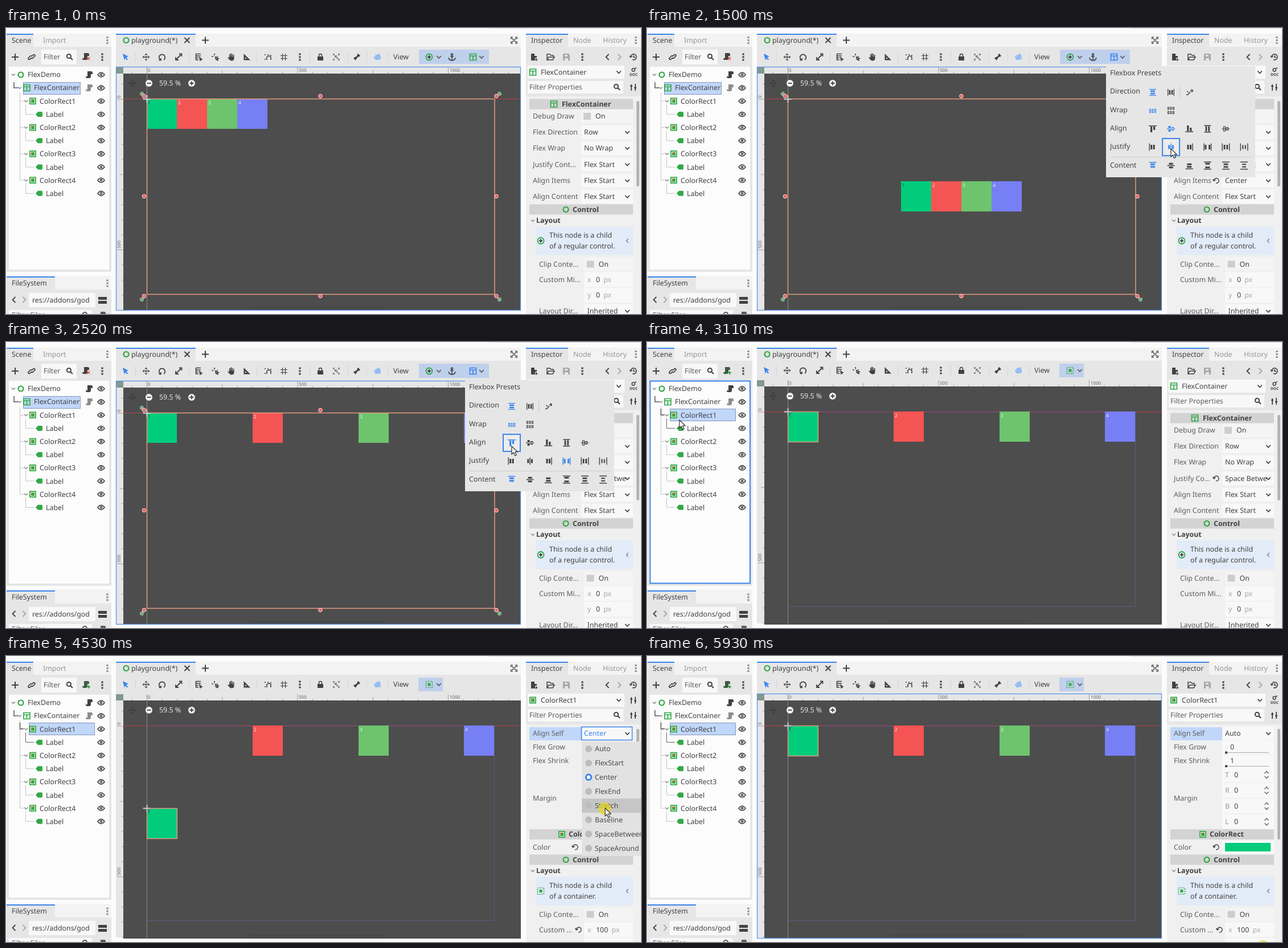
These frames come from a looping animation (1115x502 px, 6.05 s). An HTML page:

```html
<!DOCTYPE html>
<html lang="en">
<head>
<meta charset="utf-8">
<title>Flex container editor</title>
<style>
html, body { margin: 0; width: 100%; height: 100%; overflow: hidden; background: #fcfcfc }
svg { display: block; width: 100%; height: 100% }
text { font-family: "Noto Sans", "Open Sans", sans-serif; text-rendering: geometricPrecision; white-space: pre }
</style>
</head>
<body>
<svg id="stage" viewBox="0 0 1115 502"></svg>
<script>
const LOOP = 6050;
const BLUE = '#3a85ee', GREEN = '#32a847', INK = '#414141', SOFT = '#5c5c5c', PALE = '#a8a8a8';
const BASE = '#e6e6e6', FIELD = '#f8f8f8', WHITE = '#fcfcfc', ORANGE = '#e8997d';
const FILLS = ['#00cc7c', '#f55454', '#6dc46d', '#777ff5'];

// Icon paths around 0,0: [path, stroke width or 0 for a filled shape]
const ICONS = {
  plus: ['M-6 0H6M0-6V6', 2],
  close: ['M-4.5-4.5L4.5 4.5M4.5-4.5L-4.5 4.5', 2],
  down: ['M-3.8-2L0 2L3.8-2', 1.8],
  fold: ['M-3-1.5L0 1.5L3-1.5', 1.4],
  left: ['M2.5-5L-2.5 0L2.5 5', 1.8],
  right: ['M-2.5-5L2.5 0L-2.5 5', 1.8],
  less: ['M1.5-3.5L-1.5 0L1.5 3.5', 1.2],
  dots: ['M-1.6-6.6h3.2v3.2h-3.2zM-1.6-1.6h3.2v3.2h-3.2zM-1.6 3.4h3.2v3.2h-3.2z', 0],
  search: ['M2-1.5A3.6 3.6 0 1 1-5.2-1.5A3.6 3.6 0 1 1 2-1.5M1 1L5 5', 2],
  ring: ['M4.5 0A4.5 4.5 0 1 1-4.5 0A4.5 4.5 0 1 1 4.5 0', 2.2],
  eye: ['M-6 0Q0-8 6 0Q0 8-6 0zM-1.6 0a1.6 1.6 0 1 0 3.2 0a1.6 1.6 0 1 0-3.2 0', 1.6],
  script: ['M-3-6H4Q6-6 6-3V-1H3V3Q3 6 0 6H-4Q-6 6-6 3H-3z', 0],
  link: ['M-1 2L-3 4Q-5 5-6 3Q-6 1-4 0L-2-2Q0-3 1-1M1-2L3-4Q5-5 6-3Q6-1 4 0L2 2Q0 3-1 1', 1.7],
  flex: ['M-5.5-5.5H5.5V5.5H-5.5zM-5.5-2H5.5M0-2V5.5', 1.7],
  tag: ['M-6 0L-2-4.5H4.5Q6-4.5 6-3V3Q6 4.5 4.5 4.5H-2z', 0],
  arrow: ['M-5-6L5-1L1 0.5L4 4L2.5 5.5L-0.7 2L-2 6z', 0],
  move: ['M0-6.5L2.6-3.5H-2.6zM0 6.5L2.6 3.5H-2.6zM-6.5 0L-3.5-2.6V2.6zM6.5 0L3.5-2.6V2.6zM-3-.7H-1V.7H-3zM1-.7H3V.7H1zM-1.5-1.5h3v3h-3z', 0],
  turn: ['M-3 5A5.3 5.3 0 1 1 3 5M-5.5 5.5H-2V2', 1.7],
  scale: ['M-5 0V5H0M-4 4L4-4M1-5.5H5.5V-1', 1.8],
  list: ['M-5-5.5H4M-5-2H4M-5 1.5H0M-5 5H0M-4.5-5.5V5M2 1L6 4L3 6z', 1.6],
  pivot: ['M-6-1H-3M-1-6V-3M-1-1H-.5M3-1H5M1 0L6 2.5L3.5 3.5L5.5 6L1.5 4z', 1.7],
  hand: ['M-6 0L-3 1V-5H-1.4V-1H-.7V-6.5H1V-1H1.7V-5.5H3.2V-.5H4V-4H5.5V3Q5 6.5 1 6.5Q-3 6-6 0z', 0],
  ruler: ['M-5.5-6V5.5H6zM-3 0V3H0z', 0],
  snap: ['M-5-5v2M-5 3v2M0-5v2M5-4v2M-2 5V0Q2-4 5 0V5', 1.6],
  grid: ['M-6-2.5H6M-6 2.5H6M-2.5-6V6M2.5-6V6', 1.2],
  lock: ['M-5-1H5V6H-5zM-3.3-1V-3A3.3 3.3 0 0 1 3.3-3V-1H1.8V-3A1.8 1.8 0 0 0-1.8-3V-1z', 0],
  group: ['M-6-6h3v3h-3zM3-6h3v3h-3zM-6 3h3v3h-3zM3 3h3v3h-3zM-3-3h4v4h-4zM0 0h3v3H0z', 0],
  bone: ['M-5 1L0-1.5L1-5Q4-7 4-3.5Q7-4 5-1L1.5 0L-1 4Q-3 7-3.7 3.5Q-7 3-5 1z', 0],
  camera: ['M-6-1H-3Q-5-5 0-4Q2-8 5-4Q6-1 4 0L6-1V5L3 3V5H-4V2H-6z', 0],
  anchor: ['M0-3V6M-6 1Q-5 6 0 6Q5 6 6 1M-3-1H3M-1.5-4.5a1.5 1.5 0 1 1 3 0a1.5 1.5 0 1 1-3 0', 1.6],
  expand: ['M-6-6H-1.5L-6-1.5zM6-6H1.5L6-1.5zM-6 6H-1.5L-6 1.5zM6 6H1.5L6 1.5zM-5-4L-4-5L5 4L4 5zM5-4L4-5L-5 4L-4 5z', 0],
  page: ['M-5-6H1V-2H5V1H2V6H-5zM3 2h1.5v1.7H6.5v1.5H4.5V7H3z', 0],
  folder: ['M-6 5V-5H-1L1-3H5V-1M-6 5L-3 0H7L4 5z', 1.5],
  save: ['M-6-6H4L6-4V6H-6zM-3-4V-1H2V-4zM-3 2V6H3V2z', 0],
  clock: ['M-5-1A5 5 0 1 1-2 4.5M0-3V0.5H3M-7-2L-5 0.5L-2.5-1.5', 1.6],
  help: ['M-3-2.5a2.6 2.6 0 1 0 5.2 0a2.6 2.6 0 1 0-5.2 0M2-5L5-6', 1.5],
  tools: ['M-4-5V-1M-4-1V6M3-6V0M3 0V6M-6-2H-2M1 1H5', 1.8],
  reset: ['M-4.5-1A4.3 4.3 0 1 1-1 4.3M-6.5-2.5L-4.5.5L-1.5-1.5', 1.5],
  spin: ['M-3.5-2.5L0-6L3.5-2.5M-3.5 2.5L0 6L3.5 2.5', 1.3],
  row: ['M-6-6h12v1.3h-12zM-4-3.4h8v2.6h-8zM-4 .8h8v2.6h-8zM-6 4.7h12v1.3h-12z', 0],
  swap: ['M-6 4h3l4-5M1-3H5M3-5.5L5.5-3L3-.5M-2 0L-5-2', 1.4],
  nowrap: ['M-5.5-2.5h2v6h-2zM-1-2.5h2v6h-2zM3.5-2.5h2v6h-2z', 1.1],
  wrap: ['M-5.5-6h2v4h-2zM-1-6h2v4h-2zM3.5-6h2v4h-2zM-5.5 1.5h2v4h-2zM-1 1.5h2v4h-2zM3.5 1.5h2v4h-2z', 1.1],
  top: ['M-7-6h14v1.4h-14zM-4-4h3.2v10h-3.2zM1-4h3.2v6h-3.2z', 0],
  mid: ['M-7-.8h14v1.5h-14zM-4.5-5h4v10h-4zM1-3h4v6h-4z', 0],
  fill: ['M-6-6.5h12v1.4h-12zM-6 5.1h12v1.4h-12zM-3.8-4.5h2.8v9h-2.8zM1-4.5h2.8v9h-2.8z', 0],
  line: ['M-7 0H7M-4-4h3v8h-3zM1-2.5h3v5h-3z', 1.2],
  start: ['M-6.5-6.5h1.4v13h-1.4zM-3.8-4h3v8h-3zM.7-4h3v8h-3z', 0],
  centre: ['M-.7-6.5h1.4v13h-1.4zM-4.8-3.5h3v7h-3zM1.8-3.5h3v7h-3z', 0],
  between: ['M-7-6.5h1.4v13h-1.4zM5.6-6.5H7v13H5.6zM-4.8-4h3v8h-3zM1.8-4h3v8h-3z', 0],
  around: ['M-7-6.5h1.4v13h-1.4zM5.6-6.5H7v13H5.6zM-3.8-4h2.8v8h-2.8zM1-4h2.8v8H1z', 0],
  evenly: ['M-7-6.5h1.4v13h-1.4zM5.6-6.5H7v13H5.6zM-3.2-3.5h2v7h-2zM1.2-3.5h2v7h-2z', 0]
};

const rect = (x, y, w, h, fill, more = '') => `<rect x="${x}" y="${y}" width="${w}" height="${h}" fill="${fill}" ${more}/>`;
const frame = (x, y, w, h, color, sw = 1, fill = 'none') => rect(x, y, w, h, fill, `stroke="${color}" stroke-width="${sw}"`);
const disc = (x, y, r, fill, more = '') => `<circle cx="${x}" cy="${y}" r="${r}" fill="${fill}" ${more}/>`;
const path = (d, color, sw = 1) => `<path d="${d}" fill="none" stroke="${color}" stroke-width="${sw}"/>`;
const text = (x, y, s, fill = INK, size = 12.4, more = '') =>
  `<text x="${x}" y="${y + size * .36}" fill="${fill}" font-size="${size}" ${more}>${s}</text>`;
const bold = (x, y, s, size = 12.4) => text(x, y, s, INK, size, 'font-weight="600"');
const icon = (name, x, y, color = INK, turn = '') => {
  const [d, sw] = ICONS[name];
  const ink = sw ? `fill="none" stroke="${color}" stroke-width="${sw}"` : `fill="${color}" fill-rule="evenodd"`;
  return `<path transform="translate(${x} ${y}) ${turn}" d="${d}" ${ink}/>`;
};
const icons = (y, list) => list.map(([n, x, c]) => icon(n, x, y, c)).join('');
const swatchIcon = (x, y) => frame(x - 5, y - 5, 10, 10, GREEN, 1.8, '#eefaee') +
  rect(x - 3, y - 3, 6, 6, GREEN) + rect(x - 3, y - 3, 3, 3, '#c9703f');
const plusDisc = (x, y, r, fill, ink) => disc(x, y, r, fill) + path(`M${x - 3.5} ${y}h7M${x} ${y - 3.5}v7`, ink, 1.8);
const plusRing = (x, y) => disc(x, y, 5.5, 'none', `stroke="${GREEN}" stroke-width="1.8"`) + path(`M${x - 3} ${y}h6M${x} ${y - 3}v6`, INK, 2);
const childIcon = (x, y) => rect(x - 5.5, y - 5.5, 11, 11, 'none', `stroke="${GREEN}" stroke-width="1.7" stroke-dasharray="2 2"`) +
  rect(x - 2.5, y - 2.5, 5, 5, GREEN);
const tab = (x, w, y, s) => rect(x, y, w, 23, BASE) + rect(x, y, w, 2, BLUE) + text(x + 9, y + 11.5, s);

function shell() {
  return rect(0, 0, 1115, 502, WHITE) + rect(848, 0, 267, 1, '#ddd') +
    rect(1, 10, 184, 23, '#f3f3f3') + rect(1, 33, 184, 395, BASE) + tab(1, 47, 10, 'Scene') +
    text(65, 21.5, 'Import', '#969696') + icon('dots', 178, 21.5, '#8c8c8c') +
    icons(51, [['plus', 16], ['link', 45]]) + rect(62, 38, 62, 26, FIELD) + text(66, 51, 'Filter', SOFT) + icons(51, [['search', 112], ['dots', 169]]) +
    rect(1, 435, 184, 25, '#f3f3f3') + rect(1, 459, 184, 43, BASE) + tab(1, 85, 436, 'FileSystem') + icon('dots', 178, 448, '#8c8c8c') +
    icon('left', 14, 477) + icon('right', 32, 477, PALE) + rect(40, 465, 117, 25, FIELD) + text(46, 477.5, 'res://addons/god') +
    rect(162, 472, 15, 5, INK) + rect(162, 479, 15, 5, INK) + rect(5, 495, 146, 7, FIELD) +
    text(10, 504, 'Filter Files', SOFT) + icon('search', 140, 504, SOFT) + icon('script', 169, 504, SOFT) +
    rect(193, 10, 711, 23, '#f3f3f3') + rect(193, 10, 140, 23, BASE) + rect(193, 10, 140, 2, BLUE) + icon('ring', 211, 21.5, GREEN) +
    text(220, 21.5, 'playground(*)') + icon('close', 318, 21.5) + icon('plus', 350, 21.5) + icon('expand', 892, 21.5) +
    rect(913, 10, 202, 23, '#f3f3f3') + rect(913, 33, 202, 469, BASE) + rect(913, 120, 202, 382, '#f0f0f0') + tab(913, 74, 10, 'Inspector') +
    text(996, 21.5, 'Node', '#969696') + text(1048, 21.5, 'History', '#969696') + icon('dots', 1106, 21.5, '#8c8c8c') +
    icons(51, [['page', 927], ['folder', 956], ['save', 984, PALE], ['dots', 1012], ['left', 1056], ['right', 1077, PALE], ['clock', 1102]]);
}

function tree(s) {
  const y = i => 82 + i * 23.15;
  let o = rect(5, 68, 176, 356, WHITE);
  if (s.treeFocus) o += frame(5.5, 68.5, 175.5, 355, BLUE, 2);
  o += s.child ? frame(40.5, 117.5, 115, 21, '#8498bb', 1, '#c1d7fa') : frame(30.5, 95.5, 100, 21, '#8498bb', 1, '#c1d7fa');
  o += path('M14 95V105H21', '#555', 1.5) + path('M24.5 113V267' + [2, 4, 6, 8].map(i => `M24.5 ${y(i)}H31`).join(''), '#c4c4c4');
  if (s.child) o += path('M24.5 117V128H31', '#555', 1.5);
  o += icon('fold', 13, 82, '#888') + icon('ring', 26, 82, GREEN) + text(38, 82, 'FlexDemo') + icon('script', 146, 82);
  o += icon('fold', 24, 105, '#888') + icon('flex', 36.5, 105, GREEN) + text(49, 105, 'FlexContainer') + icon('script', 146, 105, '#8d8d8d');
  for (let n = 1; n < 5; n++) {
    const a = y(n * 2), b = y(n * 2 + 1);
    o += icon('fold', 35, a, '#888') + swatchIcon(47, a) + text(59, a, 'ColorRect' + n) +
      path(`M34.5 ${a + 6}V${b}H49`, s.child && n < 2 ? '#666' : '#c4c4c4') + icon('tag', 58, b, GREEN) + text(70, b, 'Label');
  }
  for (let i = 0; i < 10; i++) o += icon('eye', 167, y(i));
  return o + icon('script', 140, 50, s.child ? '#3c5c42' : INK) +
    (s.child ? path('M142 54h6M145 51v6', GREEN, 1.8) : path('M142 51l5 5M147 51l-5 5', '#e05050', 1.6));
}

function toolbar(s) {
  const y = s.child ? 50 : 51, tint = '#bfd0ec';
  let o = rect(193, 33, 711, 36, BASE) + icons(y, [['arrow', 210, BLUE], ['move', 246], ['turn', 274], ['scale', 303], ['list', 338], ['pivot', 367],
    ['hand', 395], ['ruler', 423], ['snap', 460], ['grid', 488], ['dots', 516], ['lock', 552], ['group', 580, '#888'], ['bone', 616], ['camera', 652, '#94bdf3']]);
  o += path([227, 321, 440, 533, 600, 633, 671].map(x => `M${x}.5 ${y - 9}v18`).join(''), '#d5d5d5') + text(680, y, 'View');
  if (s.child) return o + rect(724, 38, 43, 24, tint) + childIcon(743, y) + icon('down', 760, y, SOFT);
  return o + rect(725, 38, 123, 25, tint) + plusRing(743, y) +
    icon('down', 760, y, SOFT) + icon('anchor', 783, y) + icon('flex', 820, y, s.popup ? BLUE : GREEN) + icon('down', 835, y, SOFT);
}

function ruler(top, oy) {
  let h = '', v = '';
  for (let i = -9; i < 25; i++) {
    const len = i % 10 ? i % 5 ? 3 : 6 : 11, x = 247.5 + i * 26.45, y = oy + i * 26.45;
    if (x > 206 && x < 903) h += `M${x} ${top + 11}v${-len}`;
    if (y > top + 11 && y < 495) v += `M206 ${y}h${-len}`;
  }
  const num = (s, x, y, turn = '') => `<text transform="translate(${x} ${y}) ${turn}" font-size="8" fill="#666">${s}</text>`;
  return rect(193, top, 711, 11, BASE) + rect(193, top, 13, 427, BASE) + path(h + v, '#a0a0a0') + rect(193, top, 13, 11, '#83988e') +
    num('0', 249, top + 7.5) + num('500', 514, top + 7.5) + num('1000', 779, top + 7.5) +
    num('0', 201, oy - 2, 'rotate(-90)') + num('500', 201, oy + 262, 'rotate(-90)');
}

function canvas(s) {
  const top = s.child ? 67 : 69, oy = s.child ? 122 : 124, zy = s.child ? 95 : 97;
  const lead = { start: 0, center: 199, end: 398, between: 0 }[s.justify];
  const gap = s.justify == 'between' ? 185.7 : 52.9;
  let o = rect(206, top + 11, 698, 496 - top - 11, '#4d4d4d') + rect(427, 489, 238, 4, '#484848') + ruler(top, oy + 1);
  o += path(`M247.5 ${top}V496`, '#7d9480') + path(`M206 ${oy + .5}H904`, '#b8404a');
  if (s.child) o += path(`M248 ${oy + .5}H858`, '#a2447c') + path(`M248 ${oy + 342.5}H857.5V${oy}`, '#5c5a80');
  o += icon('move', 222, zy, '#3b3b3b') + disc(251, zy, 6, '#f4f4f4') + path(`M247.5 ${zy}h7`, '#444', 1.8) +
    text(269, zy, '59.5 %', '#e6e6e6') + plusDisc(326, zy, 6, '#f4f4f4', '#444');
  FILLS.forEach((fill, i) => {
    const x = Math.round(247.4 + lead + i * gap), self = i ? 'start' : s.self;
    const y = oy + (self == 'center' || s.align == 'center' ? 145 : 0), h = self == 'stretch' ? 343 : 53;
    o += rect(x, y, 53, h, fill) + text(x + 2, y + 7, i + 1, i ? '#f2f2f2' : '#145536', 8.4);
    if (s.child && !i) {
      const cross = `M${x - 6.5} ${y + .5}h13M${x + .5} ${y - 6}v13`;
      o += frame(x + .5, y + .5, 53, h, ORANGE, 1.4) + path(cross, '#555', 4) + path(cross, '#c9c9c9', 1.8);
    }
  });
  if (!s.child) {
    o += frame(247.5, 124.5, 610.5, 343, ORANGE, 1.5) + path('M240.5 125h13M247.5 118v13', '#c9c9c9', 2);
    for (const [x, y, q] of [[238, 115, 0], [867, 115, 90], [867, 477, 180], [238, 477, 270]])
      o += `<path transform="translate(${x} ${y}) rotate(${q})" d="M5 5L-2 3.5A3.7 3.7 0 1 1 3.5-2z" fill="#86ab8c"/>`;
    for (const x of [242.5, 552, 861]) for (const y of [119.5, 295.5, 470.5])
      if (x != 552 || y != 295.5) o += disc(x, y, 3.3, '#f25f5f', 'stroke="#f4e4e4"');
  }
  return o + (s.viewFocus ? frame(193.5, top - .5, 710, 496 - top, '#5b96ea', 1.3) : '');
}

const head = (y, s, x) => rect(919, y - 9, 182, 18, '#d3d3d3') + bold(x, y, s);
const row = (y, s, v, reset, dx = 0) => text(925 + dx * 2, y, s, SOFT) + rect(1010 + dx, y - 12, 91 - dx, 24, FIELD) +
  text(1015 + dx, y, v) + icon('down', 1091, y) + (reset ? icon('reset', 1000, y) : '');
const check = (y, s, dx = 0) => text(925 + dx * 2, y, s, SOFT) + rect(1010 + dx, y - 12, 91 - dx, 24, '#f4f4f4') +
  rect(1014 + dx, y - 6, 13, 12, '#cdcdcd') + text(1035 + dx, y, 'On');
const amount = (y, axis, n) => rect(1015, y - 13, 86, 26, FIELD) + text(1021, y, axis, PALE) + text(1036, y, n) +
  text(1036 + 7.2 * String(n).length + 6, y, 'px', PALE);

function layoutPart(y, child) {
  const lines = ['This node is a child', child ? 'of a container.' : 'of a regular control.'], size = child ? 100 : 0;
  return head(y, 'Control', 995) + icon('ring', 983, y, GREEN) + icon('fold', 925, y + 19.5, '#888') + bold(931, y + 19.5, 'Layout') +
    rect(930, y + 30, 171, 50, '#e2ebf8') + lines.map((s, i) => text(954, y + 45.5 + i * 18.7, s)).join('') + icon('less', 1091, y + 55, '#777') +
    (child ? childIcon : plusRing)(939, y + 55) + check(y + 96, 'Clip Conte...', 5.5) +
    text(936, y + 123, child ? 'Custom ...' : 'Custom Mi...', SOFT) + (child ? icon('reset', 1006, y + 123) : '') +
    amount(y + 123, 'x', size) + amount(y + 150.5, 'y', size) + row(y + 178.5, 'Layout Dir...', 'Inherited', false, 5.5);
}

function inspector(s) {
  const c = s.inspectChild;
  let o = rect(916, 66, 170, 23, FIELD) + (c ? swatchIcon(925, 77.5) : icon('flex', 925, 77.5, GREEN)) + text(939, 77.5, c ? 'ColorRect1' : 'FlexContainer') +
    icon('down', 1076, 77.5) + (s.menu ? icon('tools', 1102, 77.5) : icon('help', 1102, 76) + bold(1095, 81.5, 'DOC', 6.5)) +
    rect(916, 93, 168, 22, FIELD) + text(919, 104, 'Filter Properties', SOFT) + icon('search', 1073, 104) + icon('tools', 1102, 104) +
    rect(1107, 128, 5, c ? 194 : 150, '#b3b3b3', 'rx="2"');
  if (!c) {
    const moved = s.justifyText != 'Flex Start';
    return o + head(133.5, 'FlexContainer', 976) + icon('flex', 962, 133.5, GREEN) + check(155, 'Debug Draw') +
      row(183, 'Flex Direction', 'Row') + row(211, 'Flex Wrap', 'No Wrap') + row(239.5, moved ? 'Justify Co...' : 'Justify Cont...', s.justifyText, moved) +
      row(268, 'Align Items', s.alignText, s.alignText == 'Center') + row(296, 'Align Content', 'Flex Start') + layoutPart(318.5, false);
  }
  if (s.picked) o += rect(919, 125, 91, 23, '#c1d7fa');
  o += row(136, 'Align Self', s.selfText);
  if (s.menu) o += frame(1010.5, 124.5, 89, 23, BLUE, 1.5, FIELD) + text(1015, 136, s.selfText, BLUE) + icon('down', 1091, 136);
  ['Flex Grow', 'Flex Shrink'].forEach((name, i) => {
    const y = 160 + i * 24;
    o += text(925, y, name, SOFT) + rect(1010, y - 11, 91, 23, FIELD) + text(1024, y, i) + rect(1016, y + 9, 76, 1, '#aaa') + rect(1015, y + 7.5, 4, 4, INK);
  });
  o += text(925, 250, 'Margin', SOFT);
  ['T', 'R', 'B', 'L'].forEach((k, i) => {
    const y = 208.5 + i * 27.5;
    o += rect(1010, y - 13, 91, 26, FIELD) + text(1015, y, k, '#999') + text(1031, y, 0) + icon('spin', 1088, y, SOFT);
  });
  return o + head(313, 'ColorRect', 988) + swatchIcon(976, 313) + text(925, 335.5, 'Color', SOFT) + icon('reset', 1000, 335.5) +
    rect(1010, 324, 91, 24, FIELD) + rect(1015, 328, 80, 15, FILLS[0]) + layoutPart(357.5, true);
}

function popup(s) {
  if (!s.popup) return '';
  const at = i => 888 + i * 32.1, pick = on => on ? BLUE : INK;
  let o = rect(806, 67, 262, 195, BASE) + text(813, 79, 'Flexbox Presets') + path('M935.5 103V122', '#c6c6c6') + path('M813 226.5H1061', '#cecece');
  ['Direction', 'Wrap', 'Align', 'Justify', 'Content'].forEach((n, i) => o += text(813, 111 + i * 32.3, n));
  if (s.focus) o += frame(at(s.focus[0]) - 15, s.focus[1] - 15, 30, 30, BLUE, 2, '#ececec');
  o += icon('row', 888, 113, BLUE) + icon('row', 920, 113, INK, 'rotate(90)') + icon('swap', 953, 113) + icon('nowrap', 888, 145, BLUE) + icon('wrap', 920, 145);
  [['top', s.align == 'start'], ['mid', s.align == 'center'], ['top', 0, 'scale(1 -1)'], ['fill'], ['line']]
    .forEach(([n, on, turn], i) => o += icon(n, at(i), 177, pick(on), turn));
  [['start', 'start'], ['centre', 'center'], ['start', 'end', 'scale(-1 1)'], ['between', 'between'], ['around'], ['evenly']]
    .forEach(([n, key, turn = ''], i) => o += icon(n, at(i), 209, pick(key == s.justify), turn) + icon(n, at(i), 241.5, pick(!i), 'rotate(90) ' + turn));
  return o;
}

function menu(s) {
  if (!s.menu) return '';
  let o = rect(1011, 150, 104, 201, '#e2e2e2');
  ['Auto', 'FlexStart', 'Center', 'FlexEnd', 'Stretch', 'Baseline', 'SpaceBetween', 'SpaceAround'].forEach((n, i) => {
    const y = 163 + i * 24.9;
    if (Math.abs(s.mouse[1] - y) < 12.4) o += rect(1011, y - 12.4, 104, 24.9, '#c6c6c6');
    o += n == s.selfText ? disc(1023, y, 4.7, '#fff', `stroke="${BLUE}" stroke-width="3"`) : disc(1023, y, 6, '#bdbdbd');
    o += text(1034, y, n, '#4a4a4a');
  });
  return o;
}

function pointer(s) {
  if (!s.mouse) return '';
  const [x, y] = s.mouse;
  return (s.glow ? disc(x - 1, y + 1, 11, '#e6d820', 'opacity=".72"') : '') +
    `<path transform="translate(${x} ${y})" d="M0 0V14L3.3 11L5.7 16.5L8.2 15.3L5.8 10H10.3z" fill="#fff" stroke="#222" stroke-width="1.1"/>`;
}

// Time, x, y of the pointer; it jumps where the recording is cut
const MOVES = [
  [[100, 826, 47], [300, 850, 100], [700, 920, 185], [900, 920, 185], [1300, 920, 212], [1500, 920, 212], [1700, 953, 212], [1900, 985, 211],
    [2000, 989, 210], [2200, 989, 210], [2400, 888, 183], [2800, 888, 183], [3000, 150, 148], [3100, 57, 137], [3400, 57, 137]],
  [[3400, 1082, 498], [3600, 1085, 138], [3700, 1085, 138], [3900, 1048, 211], [4300, 1048, 211], [4500, 1052, 267], [5100, 1052, 267],
    [5300, 1050, 165], [5500, 1052, 165], [5600, 1065, 174], [5700, 1075, 330], [5900, 1083, 509], [6100, 1083, 509]]
];

function mouseAt(t) {
  const q = Math.floor(t / 100) * 100, keys = MOVES[t < 3410 ? 0 : 1];
  if (q < 100) return null;
  const i = Math.max(1, keys.findIndex(k => k[0] >= q)), [a, b] = [keys[i - 1], keys[i]];
  const k = Math.max(0, (q - a[0]) / (b[0] - a[0]));
  return [1, 2].map(n => a[n] + (b[n] - a[n]) * k);
}

// Last value whose time has come: since(t, first, time, value, ...)
function since(t, v, ...steps) {
  for (let i = 0; i < steps.length; i += 2) if (t >= steps[i]) v = steps[i + 1];
  return v;
}

function stateAt(t) {
  return {
    mouse: mouseAt(t),
    glow: t >= 3410,
    popup: t >= 200 && t < 2820,
    focus: since(t, null, 800, [1, 177], 1500, [1, 209], 1700, [2, 209], 1920, [3, 209], 2420, [0, 177]),
    align: since(t, 'start', 800, 'center', 2420, 'start'),
    alignText: since(t, 'Flex Start', 1000, 'Center', 2520, 'Flex Start'),
    justify: since(t, 'start', 1500, 'center', 1700, 'end', 1920, 'between'),
    justifyText: since(t, 'Flex Start', 1600, 'Center', 1800, 'Flex End', 2220, 'Space Betwe'),
    child: t >= 3110,
    inspectChild: t >= 3210,
    treeFocus: t >= 3110 && t < 3410,
    viewFocus: t < 3110 || t >= 3410 && t < 3710 || t >= 5930,
    picked: t >= 3610,
    menu: t >= 3710 && t < 5630,
    self: since(t, 'start', 4130, 'center', 4830, 'stretch', 5430, 'start'),
    selfText: since(t, 'Auto', 4330, 'Center', 4830, 'Stretch', 5430, 'Auto')
  };
}

const stage = document.getElementById('stage');
const layers = [shell, tree, toolbar, canvas, inspector, popup, menu, pointer].map(draw => {
  const g = document.createElementNS('http://www.w3.org/2000/svg', 'g');
  stage.append(g);
  return { draw, g, last: null };
});
let shown = '';

function update(t) {
  const s = stateAt(t), key = JSON.stringify(s);
  if (key === shown) return;
  shown = key;
  for (const layer of layers) {
    const html = layer.draw(s);
    if (html !== layer.last) layer.g.innerHTML = layer.last = html;
  }
}

const began = performance.now();
function tick() {
  update((performance.now() - began) % LOOP);
  requestAnimationFrame(tick);
}
tick();
</script>
</body>
</html>
```
